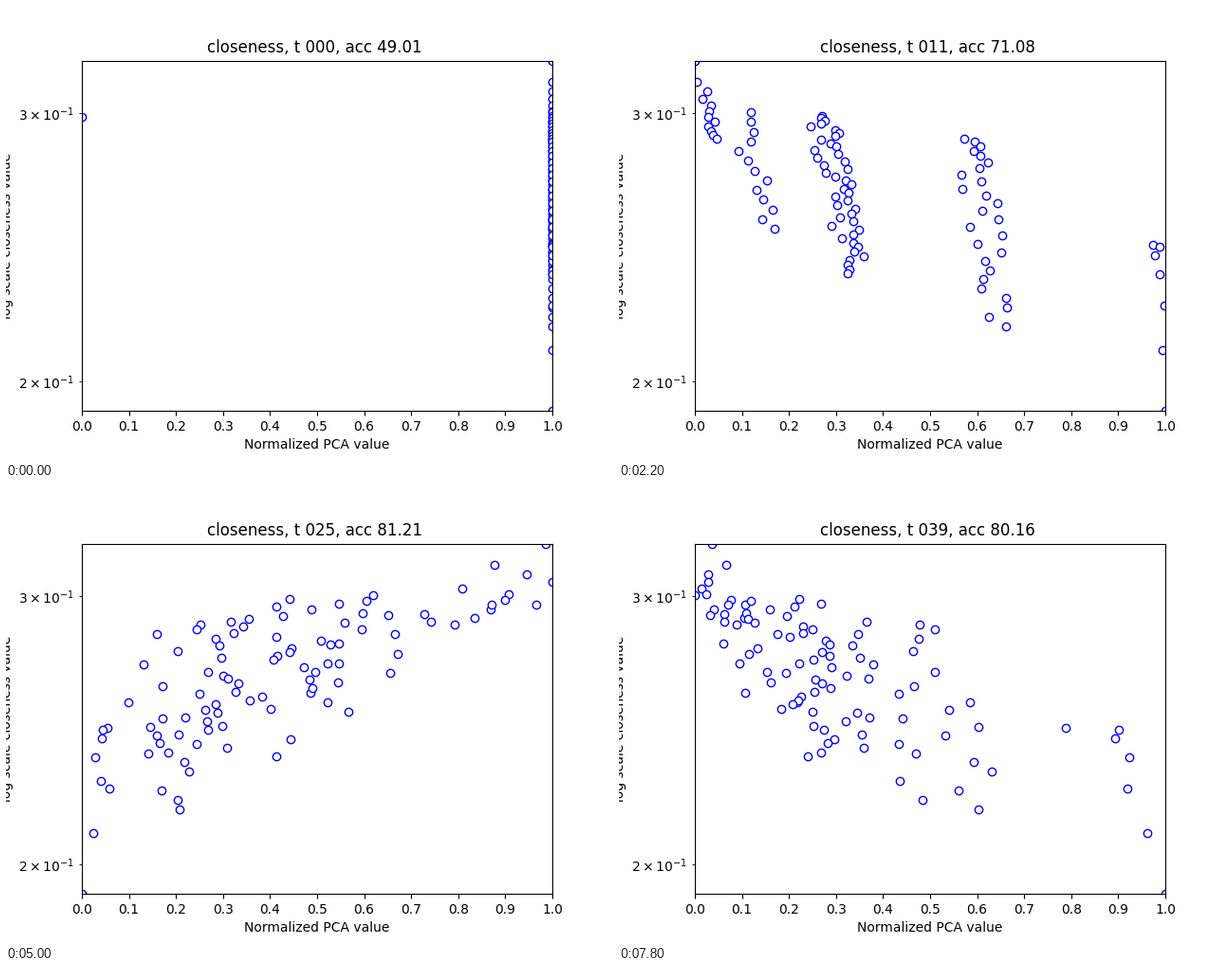
A matplotlib script for the animation above (8 s loop, 640 by 480 pixels).

```python
import numpy as np
import matplotlib.pyplot as plt
from matplotlib.animation import FuncAnimation

FRAMES = 40
STEP_MS = 200
FLIP_ON, FLIP_OFF = 21, 35      # the sign of the component flips between these
BEST = 30                       # step with the best accuracy
STRAY = 6                       # node that stands apart at the start

# Rings of nodes: count, highest and lowest closeness, skew of the fall
RINGS = [
    (12, .3246, .2886, .55),
    (13, .3004, .2519, 1),
    (42, .2987, .2354, 1.16),
    (26, .2886, .2173, 1.3),
    (7, .2458, .1913, 2.5),
]

# Step: centres of the rings, tilt, spread
KEYS = {
    7: ([.02, .08, .245, .54, .96], -.07, .035),
    11: ([.05, .145, .315, .62, .985], .08, .035),
    17: ([.09, .25, .43, .74, .98], .2, .12),
    25: ([.18, .43, .65, .85, .98], .22, .14),
    30: ([.11, .37, .54, .77, .955], .25, .14),
    39: ([.07, .13, .24, .47, .9], .17, .11),
}
TIMES = [0, *KEYS]
ACC = [49.01, 62.78, 71.08, 78.18, 81.21, 84.61, 80.16]

rng = np.random.default_rng(4)
rank = np.concatenate([np.linspace(0, 1, n) for n, *_ in RINGS])
ring = np.repeat(np.arange(len(RINGS)), [n for n, *_ in RINGS])
high, low, skew = np.array([r[1:] for r in RINGS])[ring].T
closeness = high * (low / high) ** (rank ** skew)


def normalize(x):
    return (x - x.min()) / (x.max() - x.min())


def scatter(centres, tilt, spread):
    """Rings lean and scatter most in the middle of the range."""
    c = np.array(centres)[ring]
    width = 2 * np.sqrt(c * (1 - c))
    noise = rng.uniform(-1, 1, len(c))
    return normalize(c + width * (tilt * (rank - .5) + spread * noise))


start = np.ones(len(rank))
start[STRAY] = 0
rows = np.array([start] + [scatter(*k) for k in KEYS.values()])


def positions(t):
    x = normalize(np.array([np.interp(t, TIMES, col) for col in rows.T]))
    return 1 - x if FLIP_ON <= t < FLIP_OFF else x


fig, ax = plt.subplots(figsize=(6.4, 4.8), dpi=100)
dots, = ax.plot(start, closeness, "o", mfc="white", mec="blue")
ax.set_yscale("log")
ax.set_xlim(0, 1)
ax.set_ylim(.1913, .3248)
ax.set_xticks(np.linspace(0, 1, 11))
ax.set_xlabel("Normalized PCA value")
ax.set_ylabel("log scale closeness value")
title = ax.set_title("")


def draw(t):
    dots.set_xdata(positions(t))
    best = t == BEST
    acc = np.interp(t, TIMES, ACC)
    title.set_text(f"closeness, t {t:03d}, acc {acc:.2f}" + "*" * best)
    title.set_x(.5 if best else .495)   # keeps room for the star
    return dots, title


anim = FuncAnimation(fig, draw, frames=FRAMES, init_func=lambda: draw(0),
                     interval=STEP_MS, repeat=True, repeat_delay=0)
plt.show()
```
